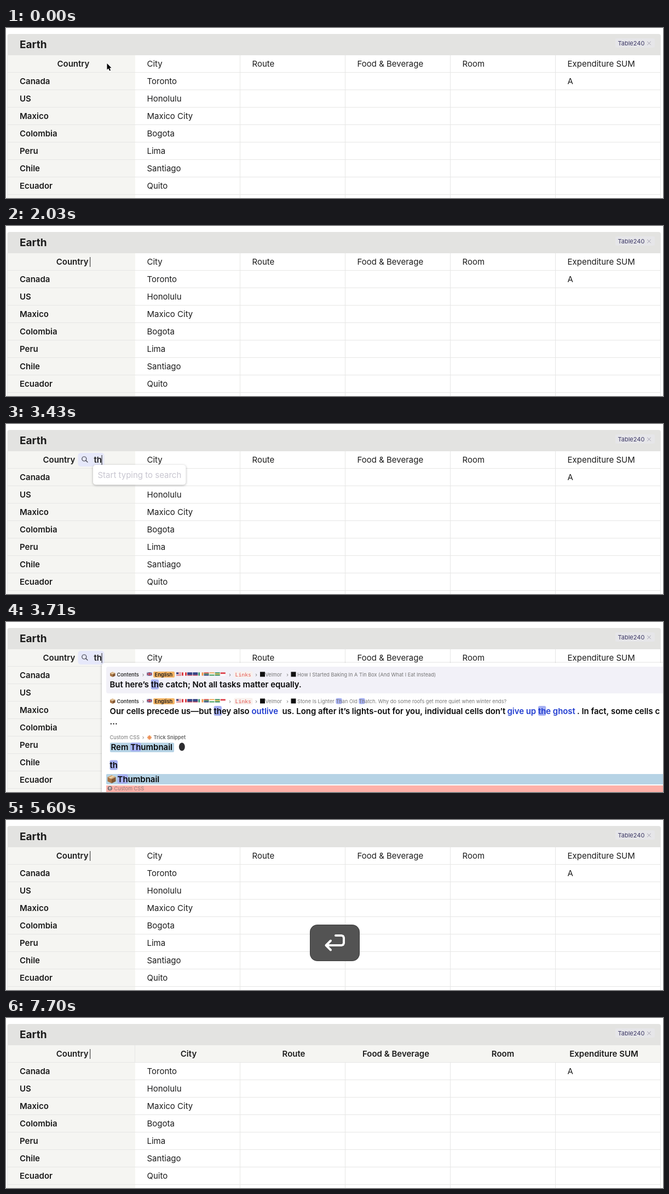
These frames come from a looping animation (1200x312 px, 7.84 s). An HTML page with a canvas:

```html
<!DOCTYPE html>
<html lang="en">
<head>
<meta charset="utf-8">
<title>Table header tag</title>
<style>
html, body { margin: 0; width: 100%; height: 100%; overflow: hidden; background: #fff; }
canvas { display: block; }
</style>
</head>
<body>
<canvas id="stage" width="1200" height="312"></canvas>
<script>
const c = document.getElementById('stage').getContext('2d');
const LOOP = 7840;
const FOCUS = 1890, PILL = 3150, TYPE_T = 3260, TYPE_H = 3360, RESULTS = 3570;
const DOWNS = [4060, 4380, 4690], ENTER = 5530, TAGGED = 5700;
const INK = '#1b1b1b', BLACK = '#080808', LINE = '#e6e6e5', SHADE = '#f5f5f2';
const PICK = '#f2f1f8', MARK = '#a6b0f2', BLUE = '#b6d3e5', GRAY = '#757575';

const HEADS = ['City', 'Route', 'Food & Beverage', 'Room', 'Expenditure SUM'];
const HEAD_X = [333.5, 525.5, 712, 907.5, 1092];
const ROWS = [['Canada', 'Toronto'], ['US', 'Honolulu'], ['Maxico', 'Maxico City'],
  ['Colombia', 'Bogota'], ['Peru', 'Lima'], ['Chile', 'Santiago'], ['Ecuador', 'Quito']];
const FLAGS = [
  ['h', '#c8414b', '#fff', '#c8414b', '#fff', '#c8414b', '#3b4a86'],
  ['v', '#d8333c', '#fff', '#d8333c'],
  ['h', '#26367c', '#26367c', '#26367c', '#b8485e'],
  ['h', '#26367c', '#26367c', '#26367c', '#b8485e'],
  ['v', '#3b9a68', '#fff', '#f0934a'],
  ['h', '#d8473f', '#3a8a5a', '#36447f'],
  ['h', '#f0a04b', '#fff', '#3a9a54'],
  ['h', '#2c8a5a', '#e3c04c', '#2c8a5a'],
  ['h', '#dc3b45', '#fff']
];

function rect(x, y, w, h, fill, r = 0) {
  c.fillStyle = fill;
  c.beginPath();
  c.roundRect(x, y, w, h, r);
  c.fill();
}

function poly(points, fill) {
  c.fillStyle = fill;
  c.beginPath();
  points.forEach(([x, y]) => c.lineTo(x, y));
  c.fill();
}

function font(size, weight = 400, family = 'Inter, sans-serif') {
  c.font = `${weight} ${size}px ${family}`;
}

function text(s, x, y, size = 15, weight = 400, color = INK, align = 'left') {
  font(size, weight);
  c.fillStyle = color;
  c.textAlign = align;
  c.fillText(s, x, y);
}

function stroke(points, color, width) {
  c.strokeStyle = color;
  c.lineWidth = width;
  c.lineCap = c.lineJoin = 'round';
  c.beginPath();
  points.forEach(([x, y]) => c.lineTo(x, y));
  c.stroke();
}

// Text with a tinted box behind each "th"
function marked(s, x, y, size, weight, color, pad) {
  font(size, weight);
  c.textAlign = 'left';
  for (const m of s.matchAll(/th/gi)) {
    const left = x + c.measureText(s.slice(0, m.index)).width;
    rect(left, y - size * 0.73 - pad, c.measureText(m[0]).width, size * 0.73 + pad * 2, MARK, 3);
  }
  text(s, x, y, size, weight, color);
}

function blinkOn(t, start) {
  return Math.floor((t - start) / 500) % 2 === 0;
}

function caret(x) {
  rect(x, 57, 1.2, 18, '#444');
}

function cursor(x, y) {
  c.beginPath();
  [[0, 0], [0, 11.5], [2.7, 9.2], [4.6, 13.6], [6.6, 12.7], [4.7, 8.4], [8, 8.2]]
    .forEach(([a, b]) => c.lineTo(x + a, y + b));
  c.closePath();
  c.strokeStyle = '#fff';
  c.lineWidth = 2;
  c.stroke();
  c.fillStyle = '#000';
  c.fill();
}

function table(tagged) {
  rect(2.5, 11, 1193.5, 39, '#e3e3e1', [4, 4, 0, 0]);
  text('Earth', 25, 36.5, 19, 700);
  rect(1113, 19, 72, 17, '#e6e6e9', 3);
  text('Table240', 1117.5, 31.5, 11, 400, '#3a3663');
  stroke([[1171.5, 25], [1177.5, 31]], '#9a98aa', 0.9);
  stroke([[1177.5, 25], [1171.5, 31]], '#9a98aa', 0.9);

  rect(3, 50, 233, 262, SHADE);
  if (tagged) rect(3, 50, 1192, 31, SHADE);
  for (let y = 81; y < 312; y += 32) rect(3, y, 1192, 1, LINE);
  for (let i = 0; i < 4; i++) {
    const top = tagged ? 82 : 50;
    rect(427 + i * 192, top, 1, 312 - top, LINE);
  }
  rect(2, 50, 1, 262, LINE);
  rect(1195, 50, 1, 262, LINE);
  if (tagged) rect(235, 50, 1, 31, LINE);

  HEADS.forEach((s, i) => {
    if (tagged) text(s, HEAD_X[i], 71, 15, 600, INK, 'center');
    else text(s, 257.5 + i * 192, 71);
  });
  ROWS.forEach(([land, city], i) => {
    text(land, 25, 103 + i * 32, 15, 600);
    text(city, 257.5, 103 + i * 32);
  });
  text('A', 1025.5, 103);
}

function countryCell(t) {
  if (t >= PILL && t < ENTER) {
    const typed = t < TYPE_T ? '' : t < TYPE_H ? 't' : 'th';
    font(15, 600);
    const w = 33.5 + c.measureText(typed).width;
    const x = 123.5 - (64 + w) / 2;
    text('Country', x, 71, 15, 600);
    rect(x + 64, 53, w, 25, '#e6e8fa', 5);
    c.strokeStyle = '#3c3c46';
    c.lineWidth = 1.2;
    c.beginPath();
    c.arc(x + 75.3, 64, 4, 0, 7);
    c.stroke();
    stroke([[x + 78.3, 67], [x + 81.5, 70]], '#3c3c46', 1.2);
    text(typed, x + 93, 71, 15, 600);
    if (blinkOn(t, TYPE_H)) caret(x + 60 + w - 1);
    return;
  }
  text('Country', t < FOCUS ? 93.5 : 91.7, 71, 15, 600);
  if (t < FOCUS) cursor(184.5, 65);
  else if (blinkOn(t, t < PILL ? FOCUS : ENTER)) caret(153);
}

function panel(x, y, w, h, blur) {
  c.save();
  c.shadowColor = 'rgba(0,0,0,.3)';
  c.shadowBlur = blur;
  c.shadowOffsetY = 1;
  rect(x, y, w, h, '#fff', 5);
  c.restore();
}

function flag(x, y, [dir, ...bands]) {
  const canton = bands.length > 5 && bands.pop();
  const n = bands.length;
  bands.forEach((color, i) => {
    if (dir === 'h') rect(x, y + i * 6 / n, 9, 6 / n, color);
    else rect(x + i * 9 / n, y, 9 / n, 6, color);
  });
  if (canton) rect(x, y, 4, 3.4, canton);
}

// Cardboard box seen from a corner
function parcel(x, y, s) {
  const at = points => points.map(([a, b]) => [x + a * s, y + b * s]);
  poly(at([[0, 0.24], [0.5, 0.48], [0.5, 1], [0, 0.76]]), '#a97444');
  poly(at([[1, 0.24], [0.5, 0.48], [0.5, 1], [1, 0.76]]), '#805531');
  poly(at([[0.5, 0], [1, 0.24], [0.5, 0.48], [0, 0.24]]), '#d0a473');
  poly(at([[0.65, 0.07], [0.85, 0.17], [0.35, 0.41], [0.15, 0.31]]), '#ead3ad');
}

function chevron(x, y) {
  text('›', x, y, 9.5, 400, GRAY, 'center');
}

function crumbs(y, title) {
  parcel(190, y - 8, 9.5);
  text('Contents', 202.5, y, 9.2, 600, '#333');
  chevron(250.5, y);
  rect(257.5, y - 7, 9, 6, '#2f3f80');
  stroke([[258, y - 6.5], [266, y - 1.5]], '#e6c3ca', 1);
  stroke([[266, y - 6.5], [258, y - 1.5]], '#e6c3ca', 1);
  rect(257.5, y - 4.7, 9, 1.4, '#d23b4a');
  rect(261.3, y - 7, 1.4, 6, '#d23b4a');
  rect(269, y - 8.5, 39, 11, '#f5b565', 2);
  text('English', 271.5, y, 9.3, 600, '#1a1a1a');
  FLAGS.forEach((f, i) => flag(311 + i * 10.1, y - 7, f));
  chevron(409, y);
  rect(416.5, y - 9, 34, 12, '#f8f1ee', 2);
  font(9.8, 400, '"Noto Sans Mono", monospace');
  c.fillStyle = '#e2504a';
  c.textAlign = 'left';
  c.fillText('Links', 418.5, y);
  chevron(457, y);
  rect(464, y - 8, 9, 9, '#111');
  text('Velmor', 473.5, y, 9.2, 400, GRAY);
  chevron(514, y);
  rect(520.5, y - 8, 9, 9, '#111');
  marked(title, 532, y, 9.2, 400, GRAY, 2);
}

function results(pick) {
  panel(175, 75, 1040, 260, 4);
  const [top, height] = [[82, 49], [131, 66], [202, 44], [248, 31]][pick];
  rect(183, top, 1020, height, PICK, 4);

  const body = (s, x, y, color = BLACK) => marked(s, x, y, 14.9, 600, color, 3.5);
  crumbs(99.5, 'How I Started Baking In A Tin Box (And What I Eat Instead)');
  body('But here’s the catch; Not all tasks matter equally.', 189.5, 120);

  crumbs(148.5, 'Stone Is Lighter Than Old Thatch. Why do some roofs get more quiet when winter ends?');
  body('Our cells precede us—but they also', 189.5, 168.5);
  body('outlive', 448.5, 168.5, '#1f3bd0');
  body('us. Long after it’s lights-out for you, individual cells don’t', 504.5, 168.5);
  body('give up the ghost', 915.5, 168.5, '#1f3bd0');
  body('. In fact, some cells c', 1043, 168.5);
  body('...', 189.5, 187.5);

  text('Custom CSS', 189.5, 215, 9.2, 400, GRAY);
  chevron(250.5, 215);
  for (let i = 0; i < 4; i++) {
    const a = i * Math.PI / 4, dx = Math.cos(a) * 3.5, dy = Math.sin(a) * 3.5;
    stroke([[262 - dx, 212 - dy], [262 + dx, 212 + dy]], i % 2 ? '#f0a24a' : '#e0603c', 1.5);
  }
  text('Trick Snippet', 269.5, 215, 9.2, 600, '#666');
  rect(190, 221.5, 117, 17.5, BLUE, 2);
  marked('Rem Thumbnail', 191.5, 235, 15, 600, BLACK, 2.5);
  c.fillStyle = '#2d2d30';
  c.beginPath();
  c.ellipse(321.3, 229, 5.5, 7.5, 0, 0, 7);
  c.fill();

  body('th', 189.5, 268);

  rect(183, 279, 1020, 19, BLUE, 2);
  parcel(185.5, 281, 15);
  marked('Thumbnail', 203.5, 293.5, 15, 600, BLACK, 3);

  rect(183, 300, 1020, 12, '#fdb1a9');
  c.fillStyle = '#857578';
  c.beginPath();
  c.arc(189.8, 305.3, 4.3, 0, 7);
  c.fill();
  stroke([[189.8, 307.5], [189.8, 303.2]], '#fff', 1);
  stroke([[188, 305], [189.8, 303.2], [191.6, 305]], '#fff', 1);
  text('Custom CSS', 197.5, 308.5, 9.2, 400, '#8f7b7b');
}

function keycap(t, pressed, x, w, lines) {
  const age = t - pressed;
  if (age < 0 || age > 700) return;
  c.save();
  c.globalAlpha = Math.min(1, (700 - age) / 200);
  rect(x, 192, w, 67, '#3a3a3a', 14);
  rect(x + 1, 193, w - 2, 65, '#535353', 13);
  lines.forEach(p => stroke(p, '#fff', 4));
  c.restore();
}

function draw(t) {
  c.fillStyle = '#fff';
  c.fillRect(0, 0, 1200, 312);
  table(t >= TAGGED);
  countryCell(t);

  const pick = DOWNS.filter(d => t >= d).length;
  if (t >= PILL && t < RESULTS) {
    panel(159, 75, 169.5, 36.5, 4);
    text('Start typing to search', 167.5, 98.5, 15, 400, '#c8c6d0');
  } else if (t >= RESULTS && t < ENTER) {
    results(pick);
  }

  if (pick && t < ENTER) {
    keycap(t, DOWNS[pick - 1], 560, 81,
      [[[600, 213], [600, 240]], [[589.5, 230], [600, 240.5], [610.5, 230]]]);
  }
  keycap(t, ENTER, 555, 91, [
    [[602, 212], [613, 212], [615.8, 213.2], [617, 216], [617, 226],
      [615.8, 228.8], [613, 230], [585, 230]],
    [[593, 221.5], [584.5, 230], [593, 238.5]]
  ]);
}

const begin = performance.now();
function tick() {
  draw((performance.now() - begin) % LOOP);
  requestAnimationFrame(tick);
}
tick();
</script>
</body>
</html>
```
